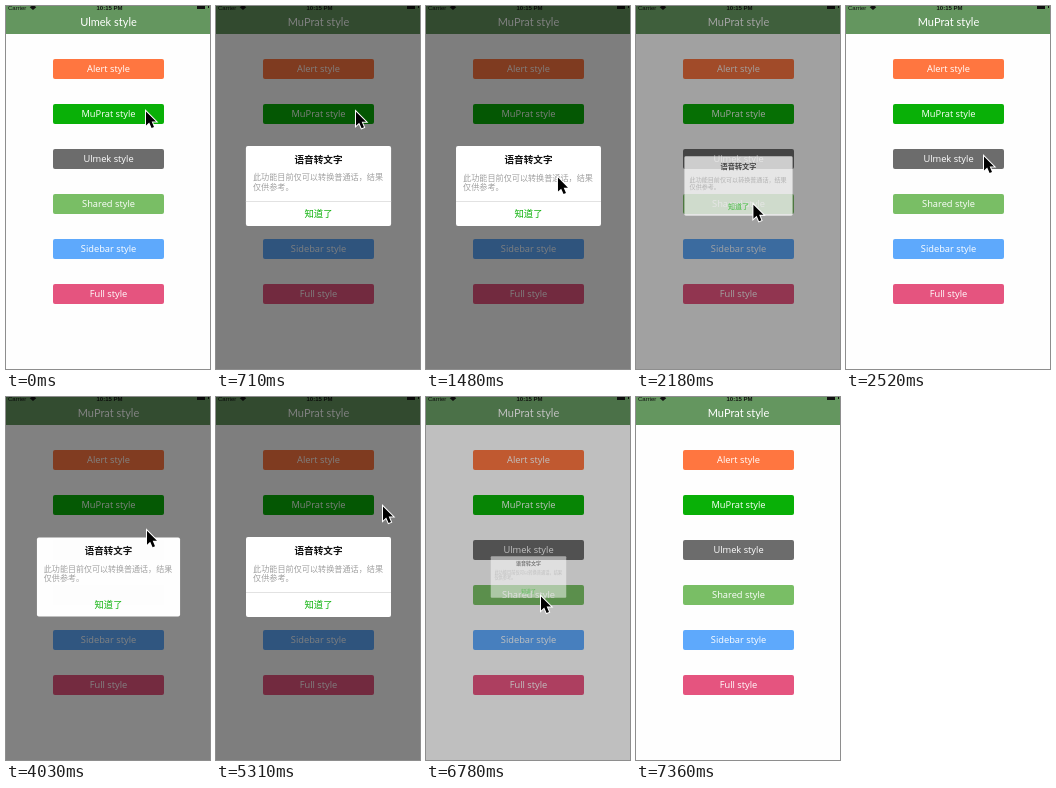
Write an HTML page with a canvas that moves like this. It is 204 px wide and 363 px high and loops after 7.87 s.

```html
<!DOCTYPE html>
<html lang="en">
<head>
<meta charset="utf-8">
<title>Popup styles</title>
<style>
  html, body { margin: 0; width: 100%; height: 100%; overflow: hidden; background: #fefefe; }
  canvas { display: block; width: 204px; height: 363px; }
</style>
</head>
<body>
<canvas></canvas>
<script>
const W = 204, H = 363, LOOP = 7870;
const canvas = document.querySelector('canvas');
const ctx = canvas.getContext('2d');
const dpr = window.devicePixelRatio || 1;
canvas.width = W * dpr;
canvas.height = H * dpr;

const UI = '"Open Sans", sans-serif';
const CJK = '"Noto Sans CJK SC", "Noto Sans CJK", sans-serif';
const buttons = [
  ['Alert', '#ff7640'], ['MuPrat', '#09b007'], ['Ulmek', '#6c6c6c'],
  ['Shared', '#79be65'], ['Sidebar', '#5ea9fc'], ['Full', '#e5547f'],
];

// Popup visits: [open time, close time]
const visits = [[550, 2060], [3580, 6605]];
const CLOSE = 350;

// Pointer tip: [time, x, y]
const pointer = [
  [0, 139, 104], [680, 139, 104], [1480, 131, 170], [1800, 116, 198],
  [2150, 116, 198], [2520, 137, 149], [3170, 120, 107], [3600, 120, 107],
  [4030, 140, 132], [4320, 121, 198], [4740, 121, 198], [5050, 172, 150],
  [5310, 166, 108], [5910, 166, 108], [6360, 114, 198], [6820, 114, 198],
  [7300, 215, 120], [LOOP, 215, 120],
];
const arrow = new Path2D('M1 1.5V15.5L4.2 12.6L6.6 18L9 17L6.7 11.6H11Z');

// Slope at key i: zero at holds and turning points
function slope(i, axis) {
  const a = pointer[i - 1], b = pointer[i], c = pointer[i + 1];
  if (!a || !c || (b[axis] - a[axis]) * (c[axis] - b[axis]) <= 0) return 0;
  return (c[axis] - a[axis]) / (c[0] - a[0]);
}

function pointerAt(t, axis) {
  const i = pointer.findLastIndex(key => key[0] <= t);
  const a = pointer[i], b = pointer[i + 1];
  if (!b) return a[axis];
  const span = b[0] - a[0], u = (t - a[0]) / span, v = 1 - u;
  return a[axis] * (1 + 2 * u) * v * v + b[axis] * u * u * (3 - 2 * u)
    + span * u * v * (slope(i, axis) * v - slope(i + 1, axis) * u);
}

const spring = s => 1 - Math.exp(-9.2 * s) * (Math.cos(13.5 * s) + 0.68 * Math.sin(13.5 * s));

// 0 hidden, 1 shown; overshoots while opening
function popupAt(t) {
  const visit = visits.find(([open, close]) => t >= open && t < close + CLOSE);
  if (!visit) return 0;
  if (t < visit[1]) return spring((t - visit[0]) / 1000);
  return (1 + Math.cos(Math.PI * (t - visit[1]) / CLOSE)) / 2;
}

function text(str, x, y, font, color, align = 'center') {
  ctx.font = font;
  ctx.fillStyle = color;
  ctx.textAlign = align;
  ctx.fillText(str, x, y);
}

function box(x, y, w, h, color, radius = 0) {
  ctx.fillStyle = color;
  ctx.beginPath();
  ctx.roundRect(x, y, w, h, radius);
  ctx.fill();
}

function drawStatusBar() {
  text('Carrier', 2, 3.6, '6px "Liberation Sans", sans-serif', '#111', 'left');
  text('10:15 PM', 103.5, 3.6, 'bold 6px "Liberation Sans", sans-serif', '#111');
  ctx.beginPath();
  ctx.moveTo(27, 4);
  ctx.arc(27, 4, 4.2, -Math.PI * 0.78, -Math.PI * 0.22);
  ctx.fill();
  box(191, 0, 8, 3, '#111');
  box(202, 0, 1, 2, '#111');
}

function drawPage(title) {
  box(0, 0, W, H, '#fefefe');
  box(0, 0, W, 28, '#64965f');
  drawStatusBar();
  text(title + ' style', 102.5, 20, '11px Lato, sans-serif', '#fff');
  buttons.forEach(([name, color], i) => {
    const y = 53 + 45 * i;
    box(47, y, 111, 20, color, 2);
    text(name + ' style', 102.5, y + 12.8, '9.3px ' + UI, '#fff');
  });
}

function drawPopup(p) {
  const scale = 0.05 + 0.95 * p;
  ctx.globalAlpha = Math.min(1, p);
  box(0, 0, W, H, 'rgba(0,0,0,.5)');
  ctx.save();
  ctx.translate(102.5, 180);
  ctx.scale(scale, scale);
  box(-72.5, -40, 145, 80, '#fff', 2);
  text('语音转文字', 0, -23.3, 'bold 9.6px ' + CJK, '#111');
  text('此功能目前仅可以转换普通话，结果', -65.5, -5.5, '8.15px ' + CJK, '#a0a0a0', 'left');
  text('仅供参考。', -65.5, 4.2, '8.15px ' + CJK, '#a0a0a0', 'left');
  if (Math.abs(p - 1) < 0.008) box(-72.5, 15, 145, 1, '#e2e2e2');
  text('知道了', 0, 31, '500 9.4px ' + CJK, '#09b007');
  ctx.restore();
  ctx.globalAlpha = 1;
}

function drawPointer(t) {
  ctx.save();
  ctx.translate(pointerAt(t, 1), pointerAt(t, 2));
  ctx.lineWidth = 2;
  ctx.strokeStyle = '#fff';
  ctx.stroke(arrow);
  ctx.fillStyle = '#000';
  ctx.fill(arrow);
  ctx.restore();
}

function frame() {
  const t = performance.now() % LOOP;
  const p = popupAt(t);
  ctx.setTransform(dpr, 0, 0, dpr, 0, 0);
  drawPage(t < visits[0][0] ? 'Ulmek' : 'MuPrat');
  if (p > 0) drawPopup(p);
  drawPointer(t);
  requestAnimationFrame(frame);
}
frame();
</script>
</body>
</html>
```
